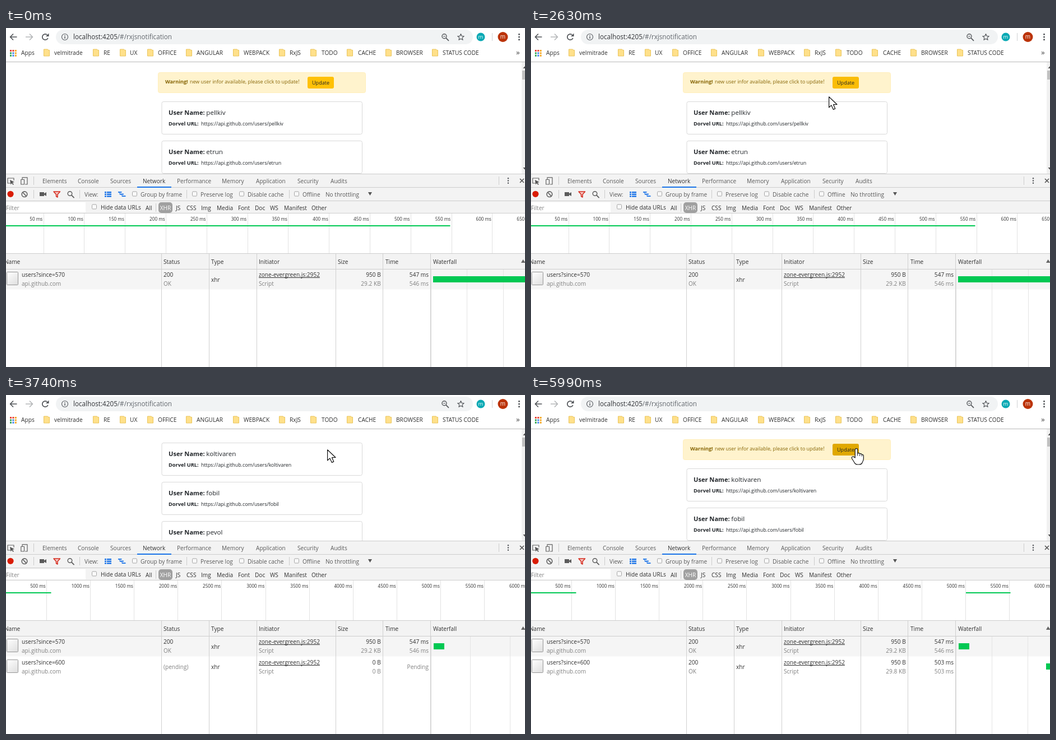
An HTML page with a canvas that plays this animation: 926x605 px, repeating every 8000 ms.

```html
<!DOCTYPE html>
<html lang="en">
<head>
<meta charset="utf-8">
<title>Network panel</title>
<style>
  html, body { margin: 0; width: 100%; height: 100%; overflow: hidden; background: #fff; }
  canvas { display: block; }
</style>
</head>
<body>
<canvas id="stage" width="926" height="605"></canvas>
<script>
const LOOP = 8000, W = 926, H = 605;
const ctx = document.getElementById('stage').getContext('2d');
const FAMILY = '"Open Sans", "Noto Sans", sans-serif';
const GREY = '#5a5a5a', DARK = '#303030', GREEN = '#00c853', BLUE = '#1a73e8';

// ---------- helpers ----------
function text(str, x, y, { size = 10.1, color = DARK, weight = 400, align = 'left' } = {}) {
  ctx.font = `${weight} ${size}px ${FAMILY}`;
  ctx.fillStyle = color;
  ctx.textAlign = align;
  ctx.fillText(str, x, y);
  return ctx.measureText(str).width;
}

function rect(x, y, w, h, color) {
  ctx.fillStyle = color;
  ctx.fillRect(x, y, w, h);
}

function box(x, y, w, h, r, fill, stroke) {
  ctx.beginPath();
  ctx.roundRect(x, y, w, h, r);
  if (fill) { ctx.fillStyle = fill; ctx.fill(); }
  if (stroke) { ctx.strokeStyle = stroke; ctx.lineWidth = 1; ctx.stroke(); }
}

function disc(x, y, r, color) {
  ctx.beginPath();
  ctx.arc(x, y, r, 0, Math.PI * 2);
  ctx.fillStyle = color;
  ctx.fill();
}

function ring(x, y, r, color, width = 1.3, from = 0, to = Math.PI * 2) {
  ctx.beginPath();
  ctx.arc(x, y, r, from, to);
  ctx.strokeStyle = color;
  ctx.lineWidth = width;
  ctx.stroke();
}

function path(d, { x = 0, y = 0, fill, stroke, width = 1.4 } = {}) {
  const shape = new Path2D(d);
  ctx.save();
  ctx.translate(x, y);
  ctx.lineJoin = 'round';
  if (fill) { ctx.fillStyle = fill; ctx.fill(shape); }
  if (stroke) { ctx.strokeStyle = stroke; ctx.lineWidth = width; ctx.stroke(shape); }
  ctx.restore();
}

function kebab(x, y, gap, r) {
  for (let i = -1; i <= 1; i++) disc(x, y + i * gap, r, '#505357');
}

function lens(x, y, r, color) {
  ring(x, y, r, color, 1.4);
  path(`M${r * .7} ${r * .7}L${r * 2} ${r * 2}`, { x, y, stroke: color, width: 1.7 });
}

// ---------- browser bar ----------
const BOOKMARKS = [
  ['velmitrade', 67, 86], ['RE', 155, 174], ['UX', 203, 221], ['OFFICE', 252, 271],
  ['ANGULAR', 321, 340], ['WEBPACK', 405, 424], ['RxJS', 487, 506], ['TODO', 543, 563],
  ['CACHE', 608, 628], ['BROWSER', 677, 696], ['STATUS CODE', 760, 779]
];

function drawBrowser() {
  path('M19.5 16H8M13 10.5L7.5 16L13 21.5', { stroke: '#4e5155', width: 1.6 });
  path('M35 16H47M42 10.5L47.5 16L42 21.5', { stroke: '#b4b6b8', width: 1.6 });
  ring(70, 16, 5.2, '#4e5155', 1.7, .4, 5.4);
  path('M76.5 9.5V15H71Z', { fill: '#4e5155' });

  box(89, 3, 744, 26, 13, '#f1f3f4');
  ring(105, 16, 5.5, '#5f6368', 1.2);
  rect(104.3, 15, 1.5, 4, '#5f6368');
  rect(104.3, 12.6, 1.5, 1.5, '#5f6368');
  const host = text('localhost:4205', 120, 20, { size: 11.7, color: '#303236' });
  text('/#/rxjsnotification', 120 + host, 20, { size: 11.7, color: '#62676d' });

  lens(782, 14.8, 4, '#55585c');
  rect(780, 14.3, 4, 1, '#55585c');
  let star = '';
  for (let i = 0; i < 10; i++) {
    const r = i % 2 ? 2.7 : 6, a = i * Math.PI / 5;
    star += (i ? 'L' : 'M') + r * Math.sin(a) + ' ' + -r * Math.cos(a);
  }
  path(star + 'Z', { x: 811.5, y: 16.5, stroke: '#55585c', width: 1.2 });
  disc(847, 16, 7.5, '#08a9b4');
  text('m', 847, 19, { size: 9.5, color: '#fff', align: 'center' });
  rect(867, 9, 1, 14, '#d0d2d4');
  disc(886.5, 16, 9, '#bb3309');
  text('m', 886.5, 19.2, { size: 10, color: '#fff', align: 'center' });
  kebab(915.5, 16, 4.7, 1.5);

  const dots = ['#ea4335', '#ea4335', '#f4a825', '#34a853', '#4285f4', '#f4a825', '#34a853', '#4285f4', '#f4a825'];
  dots.forEach((c, i) => rect(7 + i % 3 * 4.4, 39 + Math.floor(i / 3) * 4.4, 3, 3, c));
  text('Apps', 27, 48, { size: 10.2 });
  for (const [name, icon, x] of BOOKMARKS) {
    path('M.5 .5H7.5L8.5 2H10.5V12.5H.5Z', { x: icon, y: 37.5, fill: '#ffe08a', stroke: '#e9c45c', width: 1 });
    text(name, x, 48, { size: 10.2 });
  }
  text('»', 910, 48, { size: 13.5, color: '#444' });
  rect(0, 60, W, 1, '#b8b8b8');
}

// ---------- page ----------
const FIRST_USERS = ['pellkiv', 'etrun'];
const NEXT_USERS = ['koltivaren', 'fobil', 'pevol'];

function drawCard(name, y) {
  box(278, y + .5, 357.5, 58, 3, '#fff', '#d9d9d9');
  text('User Name:', 290, y + 24, { size: 11.1, weight: 700, color: '#212529' });
  text(name, 357.3, y + 24, { size: 11.6, color: '#212529' });
  text('Dorvel URL:', 290, y + 43.3, { size: 9.25, weight: 700, color: '#212529' });
  text('https://api.github.com/users/' + name, 348, y + 43.3, { size: 8.85, color: '#212529' });
}

function drawPage({ users, alert, button }) {
  ctx.save();
  ctx.beginPath();
  ctx.rect(0, 61, W, 199);
  ctx.clip();
  if (alert) {
    box(271.5, 79.5, 370, 36, 3, '#fff3cd', '#ffeeba');
    text('Warning!', 284, 99.3, { size: 9.1, weight: 700, color: '#856404' });
    text('new user infor available, please click to update!', 328, 99.3, { size: 8.94, color: '#856404' });
    box(538, 87, 47, 21, 3, button);
    text('Update', 546, 101, { size: 9.05, color: '#212529' });
  }
  const top = alert ? 131 : 85;
  users.forEach((name, i) => drawCard(name, top + 70 * i));
  rect(920, 61, 6, 199, '#f1f1f1');
  rect(921, 76, 5, 16, '#c1c1c1');
  path('M922.5 72L926 68V72Z', { fill: '#505050' });
  path('M922.5 249L926 253V249Z', { fill: '#505050' });
  ctx.restore();
}

// ---------- developer tools ----------
const TABS = [['Elements', 65], ['Console', 128], ['Sources', 186], ['Network', 244], ['Performance', 305],
  ['Memory', 385], ['Application', 446], ['Security', 520], ['Audits', 579]];
const OPTIONS = [['Group by frame', 225, 240], ['Preserve log', 332, 347], ['Disable cache', 416, 431], ['Offline', 514, 529]];
const TYPES = [['All', 249], ['JS', 303], ['CSS', 322], ['Img', 348], ['Media', 376], ['Font', 414],
  ['Doc', 444], ['WS', 471], ['Manifest', 496], ['Other', 545]];
const COLUMNS = [['Name', -3], ['Status', 281], ['Type', 366], ['Initiator', 451], ['Size', 592], ['Time', 677], ['Waterfall', 762]];

function checkbox(x, y) {
  box(x + .5, y + .5, 8, 8, 1.5, '#fafafa', '#a5a5a5');
}

function drawTabs() {
  path('M6 10H1V1H12V5', { x: 2, y: 267, stroke: '#626262', width: 1.2 });
  path('M5 4L13 8L9.5 9L12 12L10.5 13L8.3 10L6.5 12.5Z', { x: 2, y: 267, fill: '#555' });
  path('M3 4V.8H12V13H8', { x: 26, y: 266, stroke: '#626262', width: 1.2 });
  path('M.8 4.5H6.5V13H.8Z', { x: 26, y: 266, stroke: '#626262', width: 1.2 });
  rect(49, 265, 1, 15, '#ccc');
  for (const [name, x] of TABS) text(name, x, 276.7, { color: name === 'Network' ? '#333' : GREY });
  rect(234, 283, 61, 2, BLUE);
  rect(879, 265, 1, 15, '#ccc');
  kebab(896, 272.5, 4.3, 1.2);
  path('M917 269L924 276M924 269L917 276', { stroke: '#555', width: 1.6 });
}

function drawToolbar() {
  disc(8, 296.3, 5.6, '#d91c05');
  ring(33, 296.7, 4.8, '#606060', 1.6);
  path('M29.8 293.3L36.2 300.1', { stroke: '#606060', width: 1.6 });
  for (const x of [49, 131, 322, 505]) rect(x, 289, 1, 15, '#ccc');
  path('M60 293H68V295.5L72 293V300L68 297.5V300H60Z', { fill: '#5b5b5b' });
  path('M85 292H96.5L92 297V302L89.5 300.5V297Z', { fill: '#f4c9c5', stroke: '#d52b1e', width: 1.5 });
  lens(114, 295.5, 3.8, '#5b5b5b');
  text('View:', 140, 300.6, { color: GREY });
  for (let i = 0; i < 3; i++) {
    const y = 292 + i * 3.6;
    rect(176, y, 3, 2.4, BLUE);
    rect(180, y, 8, 2.4, BLUE);
    rect(200 + i * 3.5, y, 6.5, 1.8, BLUE);
  }
  path('M203 293V297H206M207 296V300.5H210', { stroke: BLUE, width: 1 });
  for (const [name, mark, x] of OPTIONS) {
    checkbox(mark, 291.5);
    text(name, x, 300.6, { color: GREY });
  }
  text('No throttling', 570, 300.6, { color: GREY });
  path('M646 293H653L649.5 299Z', { fill: '#555' });
}

function drawFilters() {
  rect(0, 311, 142, 18, '#fff');
  text('Filter', 0, 324.6, { color: '#858585' });
  checkbox(153, 314.5);
  text('Hide data URLs', 169, 324.3);
  rect(267, 313, 1, 15, '#ccc');
  box(272, 311, 25, 19, 5, '#a0a0a0');
  text('XHR', 284.5, 324.5, { color: '#fff', align: 'center' });
  for (const [name, x] of TYPES) text(name, x, 324.7);
}

function drawTimeline({ scale, spans }) {
  rect(0, 331, W, 71, '#fff');
  for (let i = 0; i <= 12; i++) {
    const x = scale.start + scale.gap * i;
    rect(Math.round(x - .5), 331, 1, 71, '#e2e2e2');
    text(`${scale.unit * (i + 1)} ms`, x - 1.8, 343.6, { size: 8.15, align: 'right' });
  }
  for (const [a, b] of spans) rect(a, 352, b - a, 2, GREEN);
}

function drawRow({ path: name, status, size, time, bar }, i) {
  const y = 430 + 36.5 * i, first = y + 14.4, second = y + 30.4, middle = y + 22.5;
  const grey = { color: '#808080' };
  const fade = ctx.createLinearGradient(2, y + 5, 21, y + 29);
  fade.addColorStop(0, '#fff');
  fade.addColorStop(1, '#dedede');
  box(1.5, Math.round(y + 5) + .5, 20, 23, 1, fade, '#969696');
  text(name, 28, first);
  text('api.github.com', 28, second, grey);
  if (status) {
    text(status[0], 281, first);
    text(status[1], 281, second, grey);
  } else {
    text('(pending)', 281, middle, grey);
  }
  text('xhr', 366, middle);
  const w = text('zone-evergreen.js:2952', 451, first);
  rect(451, Math.round(first + 1), w, 1, DARK);
  text('Script', 451, second, grey);
  text(size[0], 668.7, first, { align: 'right' });
  text(size[1], 668.7, second, { ...grey, align: 'right' });
  if (time) {
    text(time[0], 754, first, { align: 'right' });
    text(time[1], 754, second, { ...grey, align: 'right' });
  } else {
    text('Pending', 754, middle, { ...grey, align: 'right' });
  }
  if (bar) rect(bar[0], Math.round(y + 12.6), bar[1] - bar[0], 11, GREEN);
}

function drawTable({ rows, grid }) {
  rect(0, 430, W, 175, '#fff');
  rect(0, 431, W, 35.5, '#f5f5f5');
  for (const x of grid) rect(x, 430, 1, 175, '#e4e4e4');
  rect(0, 402, W, 29, '#f3f3f3');
  rect(0, 402, W, 1, '#cdcdcd');
  rect(0, 430, W, 1, '#cdcdcd');
  for (const x of [277, 362, 447, 588, 672, 757]) rect(x, 403, 1, 202, '#d0d0d0');
  rect(758, 431, 1, 174, '#dedede');
  for (const [name, x] of COLUMNS) text(name, x, 420.6);
  path('M919 419H926V418L922.5 413Z', { fill: '#666' });
  rows.forEach(drawRow);
}

function drawTools(state) {
  rect(0, 260, W, 71, '#f3f3f3');
  for (const y of [260, 284, 308, 330]) rect(0, y, W, 1, '#cdcdcd');
  drawTabs();
  drawToolbar();
  drawFilters();
  drawTimeline(state);
  drawTable(state);
}

// ---------- pointer ----------
// Each run: start, end of the last pose, step length, poses [x, y, hand].
const RUNS = [
  [370, 600, 77, [[427, 562], [346, 543], [264, 525]]],
  [1930, 2780, 78, [[249, 529], [186, 547], [147, 521], [166, 458], [226, 382], [311, 299],
    [396, 224], [471, 164], [531, 122], [576, 97, 1], [570, 93, 1]]],
  [2780, 3030, 250, [[571, 93, 1]]],
  [3030, 3270, 80, [[571, 94, 1], [570, 94, 1], [570, 93, 1]]],
  [3270, 3740, 70, [[570, 93, 1], [570, 93]]],
  [3740, 5770, 78, [[573, 97], [581, 107], [594, 125], [608, 146], [618, 161], [623, 169]]],
  [5770, LOOP, 73, [[616, 160], [599, 131], [584, 102, 1], [580.5, 95, 1]]]
];

const ARROW = 'M.6 .8V19.8L4.9 15.9L8.4 23.4L11.8 21.9L8.5 14.7L15 14.5Z';
const HAND = 'M-2.3 17V2.5Q-2.2 .6 0 .6Q2.2 .6 2.3 2.5V9Q5.4 7.7 6.2 10Q9 9 9.8 11.3' +
  'Q12.7 10.9 12.8 13.5V19Q12.7 22 10.5 25.5Q9.5 29 5 29H2Q-1.8 29 -3.2 26L-8 18.2Q-8.8 15.6 -6.5 15Q-4.5 14.7 -2.3 17Z';

function drawPointer(t) {
  const run = RUNS.find(([start, end]) => t >= start && t < end);
  if (!run) return;
  const [start, , step, poses] = run;
  const [x, y, hand] = poses[Math.min(poses.length - 1, Math.floor((t - start) / step))];
  path(hand ? HAND : ARROW, { x, y, fill: '#fff', stroke: '#111', width: 1.2 });
  if (hand) path('M2.3 9V13.5M6.2 10.5V14M9.8 11.5V14.5', { x, y, stroke: '#111', width: 1 });
}

// ---------- state ----------
const WIDE = { start: 67, gap: 72.8, unit: 50 };
const LONG = { start: 72.5, gap: 78.12, unit: 500 };

function buttonColor(t) {
  if (t >= 2710 && t < 3270 || t >= 5990) return '#e0a800';
  if (t >= 2630 && t < 2710 || t >= 5916) return '#fabd06';
  return '#ffc107';
}

function stateAt(t) {
  const clicked = t >= 3270, sent = t >= 3340, done = t >= 3896;
  const rows = [{
    path: 'users?since=570', status: ['200', 'OK'], size: ['950 B', '29.2 KB'],
    time: ['547 ms', '546 ms'], bar: sent ? [763, 782] : [762, W]
  }];
  if (sent) rows.push(done
    ? { path: 'users?since=600', status: ['200', 'OK'], size: ['950 B', '29.8 KB'], time: ['503 ms', '503 ms'], bar: [919, W] }
    : { path: 'users?since=600', size: ['0 B', '0 B'] });
  return {
    users: clicked ? NEXT_USERS : FIRST_USERS,
    alert: !clicked || done,
    button: buttonColor(t),
    scale: sent ? LONG : WIDE,
    spans: done ? [[0, 80.5], [776, 855.5]] : sent ? [[0, 80.5]] : [[0, 792.5]],
    grid: done ? [822, 886] : sent ? [828, 899] : [822, 887],
    rows
  };
}

function render(t) {
  const state = stateAt(t);
  rect(0, 0, W, H, '#fff');
  drawBrowser();
  drawPage(state);
  drawTools(state);
  drawPointer(t);
}

const began = performance.now();
function tick() {
  render((performance.now() - began) % LOOP);
  requestAnimationFrame(tick);
}
tick();
</script>
</body>
</html>
```
